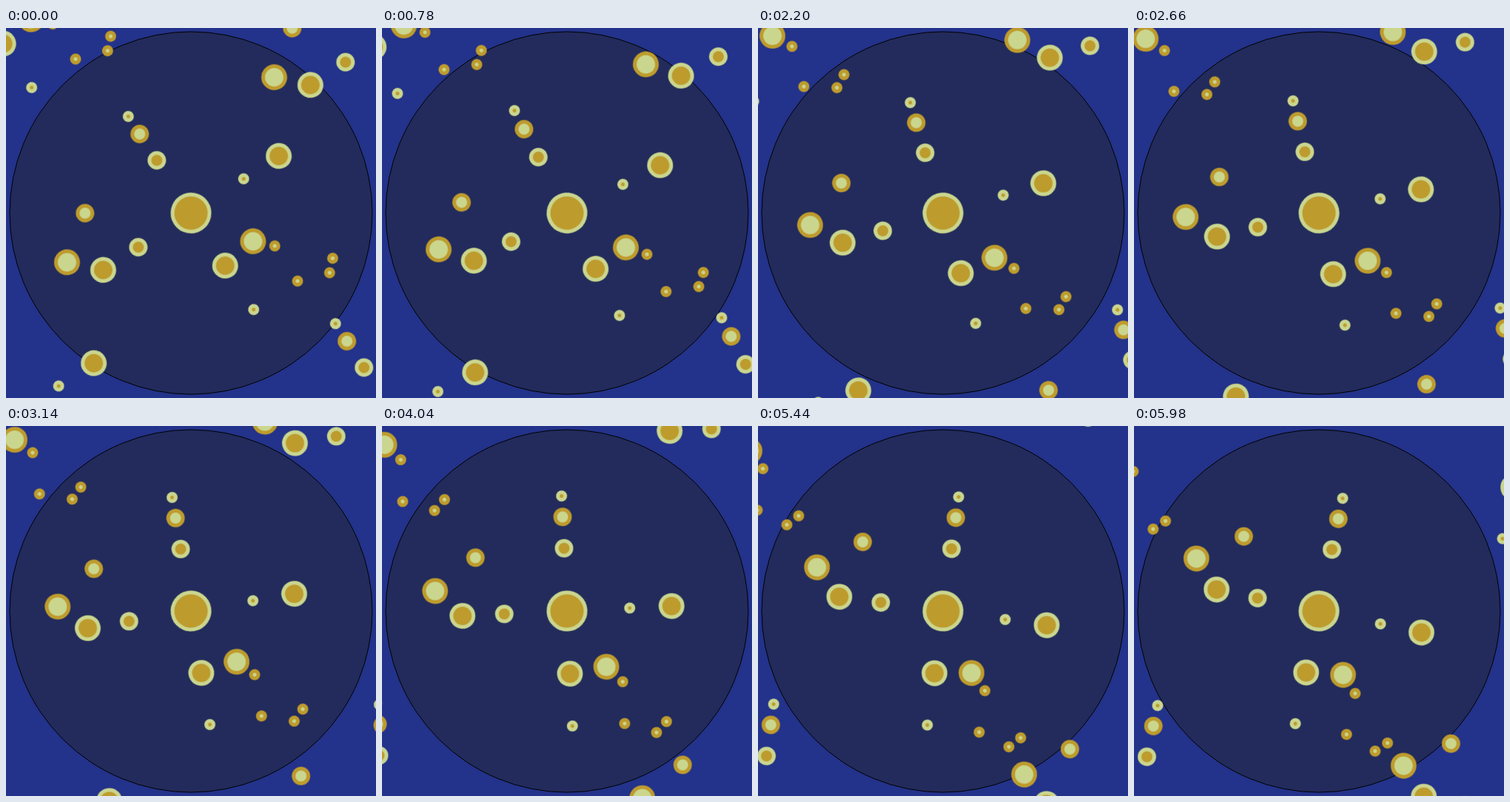
An HTML page without scripts for the animation above (6000 ms loop, 500 by 500 pixels).

```html
<!DOCTYPE html>
<html lang="en">
<head>
<meta charset="utf-8">
<title>Turning wheels</title>
<style>
  html, body { margin: 0; width: 100%; height: 100%; overflow: hidden; background: #23328a; }
  svg { display: block; width: 100vw; height: 100vh; }
  .disc { fill: #222b5b; stroke: #000; }
  .dots { stroke-width: 5; }
  .gold { fill: #be9b2d; stroke: #cad68e; }
  .pale { fill: #cad68e; stroke: #be9b2d; }
  .spin { transform-origin: 0 0; animation: spin 6s linear infinite; }
  @keyframes spin {
    from { transform: rotate(12deg); }
    to { transform: rotate(57deg); }
  }
</style>
</head>
<body>
<svg viewBox="0 0 500 500">
  <defs>
    <g id="wheel" class="dots">
      <g class="gold">
        <circle r="25"/>
        <circle cx="-110" cy="-110" r="5"/>
        <circle cx="-60" cy="-60" r="10"/>
        <circle cx="100" cy="-100" r="15"/>
        <circle cx="60" cy="-60" r="5"/>
        <circle cx="-100" cy="100" r="15"/>
        <circle cx="-60" cy="60" r="10"/>
        <circle cx="60" cy="60" r="15"/>
        <circle cx="110" cy="110" r="5"/>
      </g>
      <g class="pale">
        <circle cx="-90" cy="-90" r="10"/>
        <circle cx="-140" cy="30" r="10"/>
        <circle cx="-150" cy="100" r="15"/>
        <circle cx="90" cy="20" r="15"/>
        <circle cx="120" cy="20" r="5"/>
        <circle cx="200" cy="20" r="5"/>
        <circle cx="200" cy="40" r="5"/>
        <circle cx="160" cy="60" r="5"/>
      </g>
    </g>
  </defs>

  <circle class="disc" cx="250" cy="250" r="245"/>

  <!-- one wheel in the middle, four around the corners -->
  <g transform="translate(250 250)"><use class="spin" href="#wheel"/></g>
  <g transform="translate(-50 -50)"><use class="spin" href="#wheel"/></g>
  <g transform="translate(530 0)"><use class="spin" href="#wheel"/></g>
  <g transform="translate(0 530)"><use class="spin" href="#wheel"/></g>
  <g transform="translate(530 530)"><use class="spin" href="#wheel"/></g>
</svg>
</body>
</html>
```
